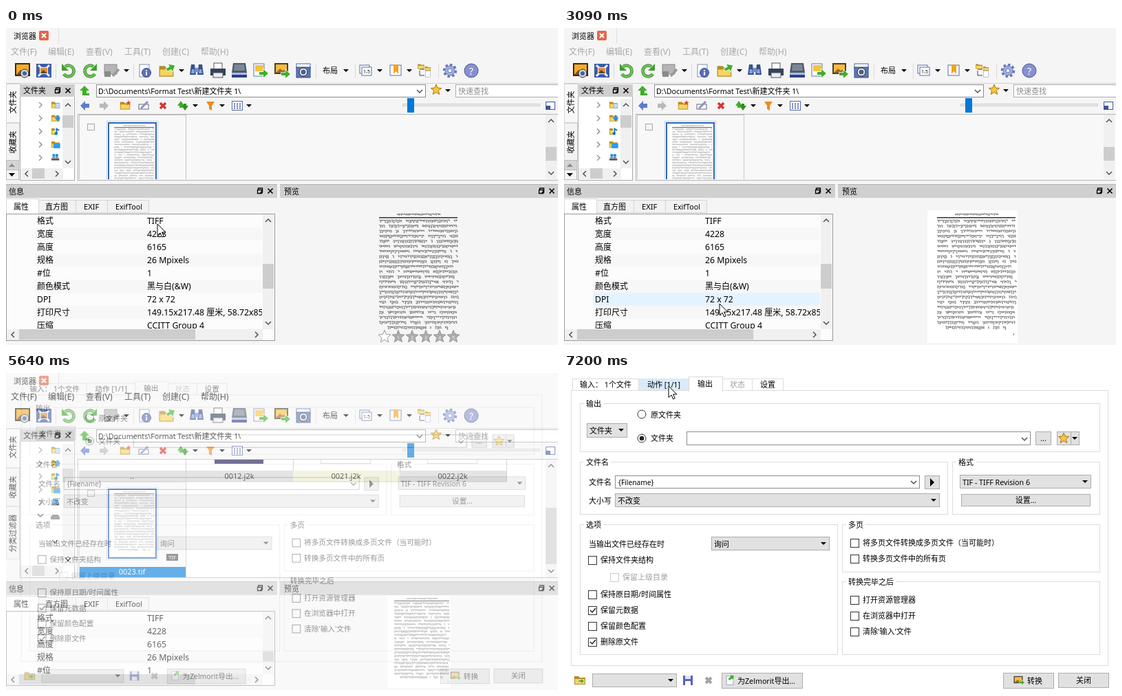
These frames come from a looping animation (802 by 461 pixels, 8000 ms). An HTML page:

```html
<!DOCTYPE html>
<html lang="zh-CN">
<head>
<meta charset="utf-8">
<title>Image browser</title>
<style>
html,body{margin:0;width:100%;height:100%;overflow:hidden;background:#f5f5f5}
svg{display:block;font-family:"Noto Sans","Noto Sans CJK SC","Noto Sans CJK JP",sans-serif}
text{white-space:pre}
</style>
</head>
<body>
<svg id="stage" width="802" height="461" viewBox="0 0 802 461"></svg>
<script>
const BLUE = '#0078d7', INK = '#000', GREY = '#8a8a8a';

// ---- drawing helpers, each returns markup ----
const rect = (x, y, w, h, f, extra = '') => `<rect x="${x}" y="${y}" width="${w}" height="${h}" fill="${f}" ${extra}/>`;
const box = (x, y, w, h, f, s, extra) => rect(x + .5, y + .5, w - 1, h - 1, f, `stroke="${s}" ${extra || ''}`);
const fill = (d, f) => `<path d="${d}" fill="${f}"/>`;
const line = (d, s = INK, w = 1) => `<path d="${d}" fill="none" stroke="${s}" stroke-width="${w}"/>`;
const disc = (x, y, r, f, s = 'none') => `<circle cx="${x}" cy="${y}" r="${r}" fill="${f}" stroke="${s}"/>`;
const at = (x, y, body, more = '') => `<g transform="translate(${x} ${y}) ${more}">${body}</g>`;
const group = (id, body, extra = '') => `<g id="${id}" ${extra}>${body}</g>`;
const clip = (id, x, y, w, h, body) =>
  `<clipPath id="${id}">${rect(x, y, w, h, INK)}</clipPath><g clip-path="url(#${id})">${body}</g>`;

// text centred vertically on y; CJK and Latin runs have their own sizes
function text(x, y, s, size = 11, color = '', anchor = 'start') {
  const latin = size === 12 ? 12.25 : size * .973;
  const runs = s.replace(/[\u2e80-\uffff]+/g, m => `<tspan font-size="${size}">${m}</tspan>`);
  return `<text x="${x}" y="${y + size * .37}" font-size="${latin}" text-anchor="${anchor}"${color && ` fill="${color}"`}>${runs}</text>`;
}
const mid = (x, y, s, size, color) => text(x, y, s, size, color, 'middle');
const caret = (x, y, c = INK) => fill(`M${x - 4} ${y - 2}h8l-4 4z`, c);
const chevron = (x, y, turn = 0, c = '#505050') => at(x, y, line('M-4-2L0 2 4-2', c, 1.5), `rotate(${turn})`);
const cross = (x, y, r, c, w) => line(`M${x - r} ${y - r}l${2 * r} ${2 * r}m0 ${-2 * r}l${-2 * r} ${2 * r}`, c, w);
const vbar = (x, y, h, ty, th, id = '') => rect(x, y, 16, h, '#f0f0f0') + chevron(x + 8, y + 9, 180) +
  chevron(x + 8, y + h - 9) + rect(x, ty, 16, th, '#cdcdcd', id && `id="${id}"`);
const hbar = (x, y, w, tx, tw) => rect(x, y, w, 16, '#f0f0f0') + chevron(x + 9, y + 8, 90) +
  chevron(x + w - 9, y + 8, -90) + rect(tx, y, tw, 15, '#cdcdcd');
const star = (x, y, r, f, s) => {
  let d = '';
  for (let i = 0; i < 10; i++) {
    const a = i * Math.PI / 5, k = i % 2 ? r * .45 : r;
    d += `${i ? 'L' : 'M'}${(x + k * Math.sin(a)).toFixed(1)} ${(y - k * Math.cos(a)).toFixed(1)}`;
  }
  return `<path d="${d}z" fill="${f}" stroke="${s}"/>`;
};

// ---- icons around 0,0 ----
const folder = fill('M-8-6h6l2 2h8v10h-16z', '#b58b28') + fill('M-7-2h14v7h-14z', '#f7d55c');
const arrow = line('M-6-2h6v-4l7 6-7 6v-4h-6z', '#fff', 1.5) + fill('M-6-2h6v-4l7 6-7 6v-4h-6z', '#3fae2a');
const picture = rect(-10, -8, 20, 16, '#4a4030') + rect(-8, -6, 16, 12, '#f7bd3c') + fill('M-8 6l6-6 4 3 3-2 3 5z', '#a3692a');
const spin = line('M-5-6A8 8 0 1 1-7 5', '#2c7a24', 4.500) + line('M-5-6A8 8 0 1 1-7 5', '#6cc653', 2.800) + fill('M-10-10v10h10z', '#3f9f30');
const sheet = rect(-7, -9, 14, 18, '#fff', 'stroke="#7d8db4"');
const icons = {
  view: rect(-11, -11, 22, 19, '#3a2c16') + rect(-9, -9, 18, 15, '#f6ab2c') + fill('M-9 6l6-7 6 4 6-2v5z', '#8a4f18') + disc(3, 4, 6, '#c9d6e8', '#333') + disc(3, 4, 3, '#4a5f88'),
  full: rect(-11, -10, 22, 20, '#3d5ca8') + cross(0, 0, 8, '#eaf0fc', 3) + rect(-6, -5, 12, 10, '#f2f5fb') + rect(-5, -4, 10, 8, '#d88f3a') + fill('M-5 4l4-5 6 5z', '#5a4432'),
  left: spin,
  right: at(0, 0, spin, 'scale(-1 1)'),
  tool: rect(-10, -9, 18, 14, '#b5b5b5', 'stroke="#8c8c8c"') + fill('M-10 1h9v8h-9z', '#8a8a8a') + line('M2 8L11-2', '#9a9a9a', 3.5),
  info: sheet + disc(3, 3, 6.5, '#5b6fb5', '#3b4c8c') + rect(2, 2, 2, 5, '#fff') + rect(2, -1, 2, 2, '#fff'),
  open: at(-1, 1, folder, 'scale(1.3)') + at(5, -4, arrow, 'rotate(-30)'),
  find: fill('M-8-9h5l2 15h-9zM8-9h-5l-2 15h9z', '#35508f') + fill('M-7-2h3l1 6h-5zM7-2h-3l-1 6h5z', '#8ea6da') + rect(-3, -4, 6, 6, '#6f8cc8'),
  print: rect(-6, -11, 12, 9, '#fff', 'stroke="#555"') + rect(-11, -3, 22, 10, '#33425f') + rect(-7, 3, 14, 7, '#e9edf5', 'stroke="#555"'),
  scan: fill('M-9-11h18l2 14h-22z', '#515a68') + fill('M-7-9h14l1 9h-16z', '#7c8796') + rect(-11, 3, 22, 3, '#a9bce8') + rect(-11, 6, 22, 4, '#2f3d83'),
  send: rect(-10, -10, 15, 18, '#fff', 'stroke="#5f74aa"') + rect(-8, -8, 12, 9, '#f6c23c') + at(4, 4, arrow),
  batch: at(-1, -3, picture) + at(5, 5, arrow),
  camera: rect(-10, -10, 20, 7, '#fff', 'stroke="#4b66a5"') + rect(-10, -5, 20, 15, '#5b78ba', 'stroke="#344a80"') + disc(0, 2, 6, '#e8edf6', '#223') + disc(0, 2, 3.5, '#53607a'),
  stack: rect(-9, -8, 14, 12, '#fff', 'stroke="#5770a8"') + rect(-6, -5, 14, 12, '#fff', 'stroke="#5770a8"') + mid(1, 1, '1-5', 7),
  mark: rect(-8, -8, 16, 15, '#fff', 'stroke="#5770a8"') + fill('M-3-9h7v14l-3.500-4-3.500 4z', '#f2a21f'),
  tree: at(-5, -6, folder, 'scale(.6)') + at(5, 5, sheet, 'scale(.5)') + at(5, -3, folder, 'scale(.5)') + line('M-7 0v7h7m-7-9h7', '#444'),
  gear: `<circle r="8.500" fill="none" stroke="#6878b8" stroke-width="3.500" stroke-dasharray="3.600 3"/>` + disc(0, 0, 7, '#9fb0e0', '#6575b5') + disc(0, 0, 3, '#f5f5f5', '#6575b5'),
  help: disc(0, 0, 10, '#8790cf', '#4d5596') + mid(0, 0, '?', 15, '#fff')
};
const backArrow = c => fill('M-7 0l7-7v4h6v6h-6v4z', c);
const dock = (x, y) => line(`M${x - 2.5} ${y - 1}v-3h6v6h-3M${x - 3.5} ${y - 1.500}h6v5h-6z`, INK, 1.300) + cross(x + 15, y, 3.5, INK, 1.600);
const goldStar = (x, y) => star(x, y, 8, '#fbc53a', '#a87512');

// ---- the scanned sheet: 131 x 193, fine script from seeded strokes ----
let seed = 7;
const rnd = () => (seed = seed * 16807 % 2147483647) / 2147483647;
function script(y, x, end, size) {
  let d = '';
  while (x < end) {
    const w = 1 + rnd() * 1.6, top = y + rnd() * .6;
    d += `M${x.toFixed(1)} ${top.toFixed(1)}h${w.toFixed(1)}v${(size * (.4 + rnd() * .8)).toFixed(1)}l-${(rnd() * w).toFixed(1)}-1`;
    x += w + (rnd() < .05 ? 6 : .7);
  }
  return d;
}
const LINES = 22;
let body = script(5, 40, 102, 2.2);
for (let i = 0; i < LINES; i++) {
  const last = i === LINES - 1;
  body += script(14 + i * 7.38, last ? 26 : 14, last ? 114 : 127, 3.4);
}
const ink = (tone = '#444') => rect(14, 10, 114, 1.5, '#333') + line(body, tone, .7) + rect(125, 179, 1, 3, '#777');
const sheetPage = rect(0, 0, 131, 193, '#fff') + ink();

// ---- browser window ----
const toolbar = [['view', 24], ['full', 55], ['left', 91], ['right', 122], ['tool', 153], ['info', 201], ['open', 234],
  ['find', 277], ['print', 308], ['scan', 339], ['send', 370], ['batch', 401], ['camera', 432], ['stack', 523],
  ['mark', 566], ['tree', 608], ['gear', 645], ['help', 676]];
const menus = [['文件(F)', 7], ['编辑(E)', 61], ['查看(V)', 116], ['工具(T)', 172], ['创建(C)', 227], ['帮助(H)', 283]];

const chrome = rect(0, 0, 802, 461, '#f5f5f5') + line('M76.500 0v22', '#ddd') +
  text(11, 12, '浏览器') + rect(48, 4, 14, 14, '#e2674d', 'rx="2"') + cross(55, 11, 3, '#fff', 2) +
  group('menubar', menus.map(([s, x]) => text(x, 35, s, 12)).join('')) +
  toolbar.map(([n, x]) => at(x, 62, icons[n])).join('') +
  [175, 255, 494, 543, 586].map(x => caret(x, 62)).join('') +
  [72, 185, 450, 507, 628].map(x => line(`M${x}.500 52v22`, '#d9d9d9')).join('') +
  text(460, 62, '布局') + line('M0 80.500h802', '#d0d0d0') +
  // address row
  at(115, 91, fill('M-8 0l7-7 7 7h-4v4h4v3h-10v-7z', '#3fae2a')) +
  box(131, 82, 479, 19, '#fff', '#8c8c8c') + text(134, 92, 'D:\\Documents\\Format Test\\新建文件夹 1\\') + chevron(601, 92) +
  goldStar(625, 90) + caret(642, 91) + box(653, 82, 152, 19, '#fff', '#aaa') + text(657, 92, '快速查找', 11, GREY) +
  // action row
  at(115, 113, backArrow('#5f7cc9')) + at(142, 113, backArrow('#b9b9b9'), 'scale(-1 1)') +
  at(173, 113, folder, 'scale(.9)') + star(178, 109, 4, '#e5482c', 'none') +
  at(200, 113, rect(-7, -2, 14, 7, '#fff', 'stroke="#667"') + line('M-4 4L6-6', '#8a94cc', 3)) + cross(228, 113, 4, '#d93333', 3.5) +
  at(257, 113, fill('M-8 0l5-7 5 7h-3v3h-4v-3z', '#3fae2a') + fill('M-2 0h3v-3h4v3h3l-5 7z', '#2f8f1e')) + caret(275, 113) +
  fill('M291 107h12l-4 6v7l-4-2v-5z', '#f08a1c') + caret(314, 113) +
  box(328, 106, 16, 14, '#fff', '#5368a8') +
  `<path d="M331 110.500h10m-10 3h10m-10 3h10" stroke="#5368a8" stroke-width="2" stroke-dasharray="2 2"/>` + caret(353, 113) +
  box(576, 110, 200, 4, '#e7eaea', '#d0d0d0') + rect(583, 102, 10, 21, BLUE) +
  box(784, 107, 14, 12, '#fff', '#3e559a') + rect(784, 113, 7, 6, '#3e559a');

const tip = (y, s) => at(10, y, mid(0, 0, s), 'rotate(-90)');
function sidebar(end, thumb, extra) {
  const drive = rect(-8, 1, 15, 4, '#555') + rect(-6, -7, 5, 4, BLUE) + rect(0, -7, 5, 4, BLUE) + rect(-6, -2, 5, 2, BLUE) + rect(0, -2, 5, 2, BLUE);
  const kinds = [
    folder + rect(0, -3, 8, 9, '#c7dcf4', 'stroke="#7da3cf"'),
    folder + fill('M-2-1h4v-5h4v5h4l-6 7z', '#1f8fe8'),
    folder + rect(-1, -6, 10, 12, '#fff') + line('M2 4v-9l5 3', BLUE, 2.5) + disc(1, 4, 3, BLUE),
    folder + rect(-4, -2, 13, 9, '#2a9bf0'),
    drive
  ];
  return box(0, 81, 21, 57, '#f8f8f8', '#d6d6d6') + tip(108, '文件夹') + box(0, 138, 20, 56, '#f3f3f3', '#d6d6d6') + tip(166, '收藏夹') +
    box(20, 82, 80, end - 81, '#fff', '#aaa') + rect(20, 82, 80, 18, '#cfcfcf') + text(25, 91, '文件夹') + dock(75, 91) +
    kinds.map((k, i) => chevron(50, 112 + i * 19.2, -90, '#999') + at(72, 112 + i * 19.2, k, 'scale(.75)')).join('') +
    vbar(82, 103, end - 120, thumb[0], thumb[1]) + hbar(21, end - 17, 62, 38, 18) + extra;
}

const fields = [['格式', 'TIFF'], ['宽度', '4228'], ['高度', '6165'], ['规格', '26 Mpixels'], ['#位', '1'], ['颜色模式', '黑与白(&amp;W)'],
  ['DPI', '72 x 72'], ['打印尺寸', '149.15x217.48 厘米, 58.72x85'], ['压缩', 'CCITT Group 4']];
function infoPane(dy, name) {
  const top = 271 + dy;
  const bands = [1, 3, 5, 7].map(i => rect(42, top + i * 19, 330, 19, '#f7f7f7')).join('');
  return rect(0, 228 + dy, 394, 19, '#d0d0d0') + rect(398, 228 + dy, 404, 19, '#d0d0d0') + line(`M0 ${227.5 + dy}h394m4 0h404`, '#b5b5b5') +
    text(4, 238 + dy, '信息') + dock(369, 237 + dy) + text(404, 238 + dy, '预览') + dock(778, 237 + dy) +
    [[47, 55], [101, 47], [147, 61]].map(([x, w]) => box(x, 250 + dy, w, 19, '#f2f2f2', '#d3d3d3')).join('') +
    box(0, 248 + dy, 48, 23, '#fff', '#d8d8d8') +
    text(11, 260 + dy, '属性') + text(57, 260 + dy, '直方图') + text(113, 260 + dy, 'EXIF', 11.5) + text(159, 260 + dy, 'ExifTool') +
    box(0, top - 1, 391, 456 - top, '#fcfcfc', '#999') +
    clip('list' + name, 1, top, 371, 437 - top, bands +
      rect(42, 0, 330, 19, '#e5f3ff', `id="hover${name}"`) +
      fields.map(([k, v], i) => text(45, top + 10 + i * 19, k, 12) + text(205, top + 10 + i * 19, v, 12)).join('')) +
    vbar(373, top, 167 - dy, dy ? 405 : 343, dy ? 14 : 36) + hbar(1, 438, 372, 19, 256);
}

const thumb = y => box(118, y + 2, 11, 10, '#f4f4f4', '#a8a8a8') + box(146, y - 2, 75, 106, '#fff', '#c3d3ea') +
  at(150, y + 2, ink('#777'), 'scale(.51)') + rect(149, y + 1, 69, 100, 'none', 'stroke="#2c64b4" stroke-width="2"');

const small = box(104, 125, 699, 97, '#f8f8f8', '#b4b4b4') +
  clip('paneA', 105, 126, 696, 94, box(106, 126, 156, 150, '#f8f8f8', '#c4c4c4') + thumb(137)) + vbar(784, 126, 94, 173, 20) +
  sidebar(221, [127, 18], box(0, 192, 19, 15, '#d5d5d5', '#bbb') + fill('M4 202h9l-4.500-5z', GREY) +
    box(0, 206, 19, 15, '#f5f5f5', '#bbb') + fill('M4 211h9l-4.500 5z', INK)) +
  infoPane(0, 'A') +
  group('white', rect(528, 265, 131, 193, '#fff')) + at(528, 265, ink()) +
  group('stars', [0, 1, 2, 3, 4, 5].map(i => star(550 + i * 20, 449, 9.5, i ? '#acacac' : '#fff', '#999') +
    (i ? mid(550 + i * 20, 450, '' + i, 8, '#eee') : '')).join(''));

const cells = [['..', 106], ['0012.j2k', 262], ['0021.j2k', 417], ['0022.j2k', 572]];
const large = box(104, 125, 699, 173, '#fff', '#b4b4b4') +
  clip('paneB', 105, 126, 679, 171, group('scroll',
    rect(303, 90, 71, 42, '#17104f') + rect(307, 90, 63, 36, '#fff') +
    [457, 612].map(x => box(x, 90, 73, 42, '#fff', '#ccc') + rect(x + 16, 118, 40, 1, '#ddd')).join('') +
    cells.map(([s, x], i) => rect(x, 142, 155, 16, i === 2 ? '#ecedcb' : '#d2d2d2') +
      line(`M${x + 155}.500 100v58h-155`, '#bbb') + mid(x + 77, 150, s, 11.3)).join('') +
    box(106, 158, 156, 140, '#f8f8f8', '#c4c4c4') + thumb(168) +
    rect(233, 263, 17, 10, '#555') + mid(241.500, 268, 'TIF', 8, '#fff') +
    rect(107, 282, 154, 15, BLUE) + mid(183, 289, '0023.tif', 11.3, '#fff'))) +
  vbar(784, 126, 171, 196, 82, 'grip') +
  sidebar(297, [139, 20], box(0, 194, 20, 77, '#f3f3f3', '#d6d6d6') + tip(233, '分类过滤器') +
    chevron(50, 207) + fill('M65 209l3-3h7l3 3v4h-13z', '#777') + chevron(71, 245)) +
  infoPane(76, 'B') + at(554, 324, sheetPage, 'scale(.702 .694)');

// ---- context menu ----
const items = [['打开', 201, 'Ctrl+O'], ['全屏', 224, 'F11'], ['打开', 247, ''], ['打开当前文件夹', 270, 'Ctrl+O', 1],
  ['用资源管理器打开文件', 292, ''], ['Open all selected', 314, ''], ['剪切', 345, 'Ctrl+X'], ['复制', 368, 'Ctrl+C'],
  ['图像数据', 391, 'Ctrl+Shift+C'], ['粘贴', 413, 'Ctrl+V', 1], ['复制到...', 445, 'Alt+C']];
const context = rect(184, 191, 296, 280, '#000', 'opacity=".18"') + box(180, 187, 297, 280, '#eeeeee', '#a3a3a3') +
  items.map(([s, y, key, off]) => text(215, y, s, 12, off ? GREY : INK) + text(386, y, key, 12, off ? GREY : INK)).join('') +
  line('M210 329.500h263M210 429.500h263', '#c8c8c8') + fill('M457 242v8l4-4z', INK) +
  at(194, 202, icons.view, 'scale(.7)') + at(194, 225, icons.full, 'scale(.7)') +
  at(194, 248, folder) + at(196, 250, arrow, 'scale(.6)') +
  line('M190 338l7 11M199 338l-7 11', '#6c7894', 1.800) + disc(190, 351, 2.5, 'none', '#44589a') + disc(198, 351, 2.5, 'none', '#44589a') +
  at(196, 367, sheet, 'scale(.55)') + at(192, 370, sheet, 'scale(.55)') +
  box(187, 407, 14, 15, '#aaa', '#888') + rect(190, 410, 8, 9, '#eee') + at(194, 446, folder) + at(197, 444, arrow, 'scale(.6)');

// ---- conversion dialog ----
const face = '#e1e1e1', edge = '#adadad', rim = '#dcdcdc';
const frame = (x, y, r, b, s) => box(x, y, r - x, b - y, 'none', rim) + rect(x + 6, y - 3, s.length * 11 + 6, 8, '#fff') + text(x + 9, y + 1, s);
const button = (x, y, w, h, s = '') => box(x, y, w, h, face, edge) + mid(x + w / 2, y + h / 2, s);
const drop = (x, y, w, h, s = '') => box(x, y, w, h, face, edge) + text(x + 4, y + h / 2 + .5, s) + caret(x + w - 9, y + h / 2);
const check = (x, y, s, on, off) => box(x, y - 6, 13, 13, '#fff', off ? '#ccc' : '#333') +
  (on ? line(`M${x + 3} ${y}l3 3 5-6`, '#222', 1.500) : '') + text(x + 18, y, s, 11, off ? '#a0a0a0' : INK);
const tab = (x, w, s, c) => box(x, 8, w, 18, '#fff', rim) + mid(x + w / 2, 17, s, 11, c);

const dialog = rect(-20, -20, 842, 501, '#fff') + box(10, 25, 781, 401, '#fff', rim) +
  tab(12, 97, '输入： 1个文件') + tab(108, 74, '') + group('tabHover', rect(109, 8, 72, 17, '#d9ebf9')) + mid(145, 17, '动作 [1/1]') +
  tab(230, 44, '状态', '#a0a0a0') + tab(273, 46, '设置') +
  box(181, 5, 50, 22, '#fff', rim) + rect(182, 25, 48, 2, '#fff') + mid(205, 16, '输出') +
  frame(23, 44, 779, 115, '输出') + button(33, 73, 59, 21) + text(37, 84, '文件夹') + caret(83, 83) +
  disc(113, 60, 6, '#fff', '#333') + text(126, 61, '原文件夹') +
  `<circle id="radio" cx="113" cy="95" r="6" fill="#fff" stroke="#333"/>` + disc(113, 95, 3.3, '#222') + text(126, 95, '文件夹') +
  box(178, 85, 500, 20, '#fff', '#8c8c8c') + chevron(669, 96) + button(685, 85, 23, 20, '...') + button(716, 85, 33, 20) +
  goldStar(726, 95) + line('M736.500 86v18', edge) + caret(742, 95) +
  frame(23, 129, 558, 206, '文件名') + text(36, 159, '文件名') + box(74, 149, 443, 19, '#fff', '#8c8c8c') + text(79, 159, '{Filename}', 10.5) +
  chevron(508, 159) + button(524, 149, 22, 20) + fill('M532 153v12l6-6z', INK) +
  text(36, 186, '大小写') + drop(74, 175, 472, 20, '不改变') +
  frame(564, 129, 779, 206, '格式') + drop(575, 148, 191, 20, 'TIF - TIFF Revision 6') + button(577, 176, 188, 18, '设置...') +
  frame(23, 220, 398, 410, '选项') + text(36, 249, '当输出文件已经存在时') + drop(214, 238, 172, 20, '询问') +
  check(35, 272, '保持文件夹结构') + check(67, 297, '保留上级目录', 0, 1) + check(35, 322, '保持原日期/时间属性') +
  check(35, 345, '保留元数据', 1) + check(35, 368, '保留颜色配置') + check(35, 391, '删除原文件', 1) +
  frame(404, 220, 779, 290, '多页') + check(416, 247, '将多页文件转换成多页文件（当可能时）') + check(416, 270, '转换多页文件中的所有页') +
  frame(404, 303, 779, 410, '转换完毕之后') + check(416, 330, '打开资源管理器') + check(416, 353, '在浏览器中打开') + check(416, 376, "清除'输入'文件") +
  at(23, 447, folder) + at(25, 448, arrow, 'scale(.6)') + drop(41, 437, 123, 20) +
  at(180, 447, rect(-7, -7, 14, 14, '#5a62bd') + rect(-4, -7, 8, 5, '#dfe2f5') + rect(-4, 1, 8, 6, '#fff')) + cross(210, 447, 4, '#a5a5a5', 4) +
  button(229, 436, 118, 23) + at(241, 447, sheet, 'scale(.7)') + at(243, 443, arrow, 'scale(.75) rotate(-40)') + text(252, 448, '为Zelmorit导出...') +
  button(638, 436, 74, 23) + at(660, 446, picture, 'scale(.65)') + at(665, 450, arrow, 'scale(.6)') + text(673, 448, '转换') +
  button(718, 436, 74, 22, '关闭');

const pointer = `<path id="pointer" d="M0 0v16.500l4-3.500 2.600 6 2.600-1.200-2.600-5.800h5.200z" fill="#fff" stroke="#000"/>`;

const stage = document.getElementById('stage');
stage.innerHTML = chrome + group('small', small) + group('large', large) + group('context', context) + group('dialog', dialog) + pointer;

// ---- timeline: every track holds its value until the next entry ----
const LOOP = 8000;
const tracks = {
  pointer: [[0, 220, 285], [960, 222, 297], [1110, 224, 305], [1230, 225, 316], [1350, 226, 322], [1500, 226, 325], [1650, 226, 340],
    [1800, 226, 359], [1950, 226, 372], [2070, 226, 382], [2190, 226, 391], [2340, 226, 401], [3210, 183, 190], [4320, -50, 0],
    [6030, 242, 342], [6180, 226, 290], [6300, 200, 215], [6420, 160, 132], [6570, 158, 118], [6690, 157, 98], [6810, 156, 77],
    [6960, 155, 55], [7080, 153, 30], [7200, 152, 19]],
  row: [[0, -1], [960, 1], [1230, 2], [1650, 3], [1800, 4], [1950, 5], [2190, 6]],
  stars: [[0, 1], [1110, .7], [1230, .5], [1350, .3], [1500, .25], [1650, 0]],
  context: [[0, 0], [3800, .35], [3920, .75], [4040, 1], [5640, 0]],
  scroll: [[0, 10], [4320, 7], [4440, 3], [4560, 0]],
  dialog: [[0, 0, .96], [5640, .4, .97], [5760, .85, .991], [5880, 1, 1]]
};
const value = (name, t) => tracks[name].findLast(step => step[0] <= t).slice(1);
const el = id => document.getElementById(id);
const set = (id, key, v) => el(id).setAttribute(key, v);
const show = (id, on) => set(id, 'opacity', +on);

function draw(t) {
  const second = t >= 3210;
  const [x, y] = value('pointer', t), [row] = value('row', t), [stars] = value('stars', t);
  const [scroll] = value('scroll', t), [alpha, zoom] = value('dialog', t);
  show('small', !second);
  show('large', second);
  set('menubar', 'fill', second ? INK : '#a8a8a8');
  set('hoverA', 'y', 271 + row * 19);
  show('hoverA', row >= 0);
  show('hoverB', 0);
  show('stars', stars);
  show('white', 1 - stars);
  show('context', value('context', t)[0]);
  set('scroll', 'transform', `translate(0 ${scroll})`);
  set('grip', 'y', 196 - scroll / 2);
  show('dialog', alpha);
  set('dialog', 'transform', `translate(401 231) scale(${zoom}) translate(-401 -231)`);
  show('tabHover', t >= 7200);
  set('radio', 'stroke', t >= 6690 && t < 6960 ? BLUE : '#333');
  set('pointer', 'transform', `translate(${x} ${y})`);
}
const start = performance.now();
function tick() {
  draw((performance.now() - start) % LOOP);
  requestAnimationFrame(tick);
}
tick();
</script>
</body>
</html>
```
